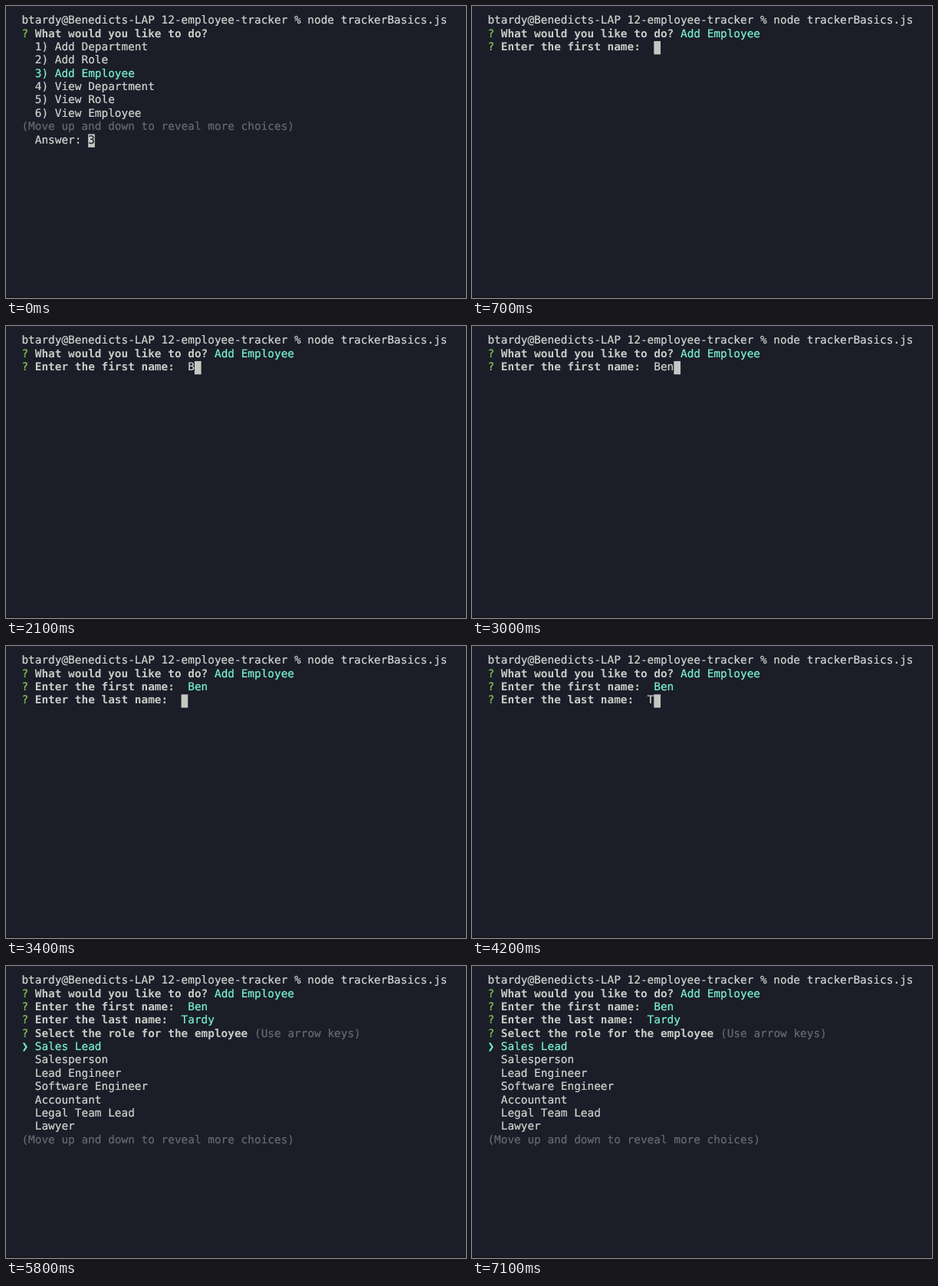
An HTML page for the animation above (8 s loop, 600x382 px).

```html
<!DOCTYPE html>
<html lang="en">
<head>
<meta charset="utf-8">
<title>Employee tracker terminal</title>
<style>
  html, body { margin: 0; width: 100%; height: 100%; overflow: hidden; background: #1b1e29; }
  svg { display: block; width: 100vw; height: 100vh; }
  text {
    font: 14.41px "DejaVu Sans Mono", "Liberation Mono", monospace;
    white-space: pre;
    text-rendering: geometricPrecision;
    fill: currentColor;
    stroke: currentColor;
    stroke-width: 0.2px;
  }
  .bold { font-weight: bold; stroke: none; }
</style>
</head>
<body>
<svg viewBox="0 0 600 382">
  <rect width="600" height="382" fill="#1b1e29"/>
  <rect y="380" width="600" height="2" fill="#181922"/>
  <g id="screen"></g>
</svg>
<script>
const LOOP = 8000;
const LEFT = 20.4, TOP = 23.2, CELL = 8.675, LINE = 17.37;
const COLOR = {
  text: '#d4d4cf', bold: '#cbcbc6', cyan: '#7af3d2',
  green: '#8ccf4d', dim: '#686a70', dark: '#1b1e29', cursor: '#c7c7c2'
};
const FIRST = 'Ben', LAST = 'Tardy';
const FIRST_KEYS = [2100, 2600, 2700];
const LAST_KEYS = [4200, 4400, 4500, 4900, 5000];
const PICKED = 100, FIRST_DONE = 3300, LAST_DONE = 5800;

const ACTIONS = ['Add Department', 'Add Role', 'Add Employee',
  'View Department', 'View Role', 'View Employee'];
const ROLES = ['Sales Lead', 'Salesperson', 'Lead Engineer',
  'Software Engineer', 'Accountant', 'Legal Team Lead', 'Lawyer'];
const MORE = '(Move up and down to reveal more choices)';

const screen = document.getElementById('screen');

function put(row, col, str, color = 'text') {
  const x = LEFT + col * CELL, y = Math.round(TOP + row * LINE);
  const cls = color === 'bold' ? ' class="bold"' : '';
  return `<text x="${x.toFixed(2)}" y="${y}" color="${COLOR[color]}"${cls}>${str}</text>`;
}

function cursor(row, col) {
  const x = LEFT + col * CELL, y = TOP + row * LINE - 12;
  return `<rect x="${x.toFixed(2)}" y="${y.toFixed(2)}" width="${CELL}" height="${LINE}" fill="${COLOR.cursor}"/>`;
}

const question = (row, str) => put(row, 0, '?', 'green') + put(row, 2, str, 'bold');

// One text prompt: typed letters with a cursor, then the accepted answer.
function prompt(row, label, answer, keys, done, t) {
  const col = label.length + 4;
  if (t >= done) return question(row, label) + put(row, col, answer, 'cyan');
  const n = keys.filter(k => t >= k).length;
  return question(row, label) + put(row, col, answer.slice(0, n)) + cursor(row, col + n);
}

function actionMenu() {
  return ACTIONS.map((a, i) => put(i + 2, 2, `${i + 1}) ${a}`, i === 2 ? 'cyan' : 'text')).join('')
    + put(8, 0, MORE, 'dim')
    + put(9, 2, 'Answer:') + cursor(9, 10) + put(9, 10, '3', 'dark');
}

function roleMenu() {
  const title = 'Select the role for the employee';
  return question(4, title) + put(4, title.length + 3, '(Use arrow keys)', 'dim')
    + put(5, 0, '❯', 'cyan')
    + ROLES.map((r, i) => put(i + 5, 2, r, i ? 'text' : 'cyan')).join('')
    + put(12, 0, MORE, 'dim');
}

function scene(t) {
  let out = put(0, 0, 'btardy@Benedicts-LAP 12-employee-tracker % node trackerBasics.js')
    + question(1, 'What would you like to do?');
  if (t < PICKED) return out + actionMenu();
  out += put(1, 29, 'Add Employee', 'cyan')
    + prompt(2, 'Enter the first name:', FIRST, FIRST_KEYS, FIRST_DONE, t);
  if (t >= FIRST_DONE) out += prompt(3, 'Enter the last name:', LAST, LAST_KEYS, LAST_DONE, t);
  if (t >= LAST_DONE) out += roleMenu();
  return out;
}

let shown = '', start = performance.now();
function frame(now) {
  const next = scene(Math.max(0, now - start) % LOOP);
  if (next !== shown) screen.innerHTML = shown = next;
  requestAnimationFrame(frame);
}
frame(start);
</script>
</body>
</html>
```
